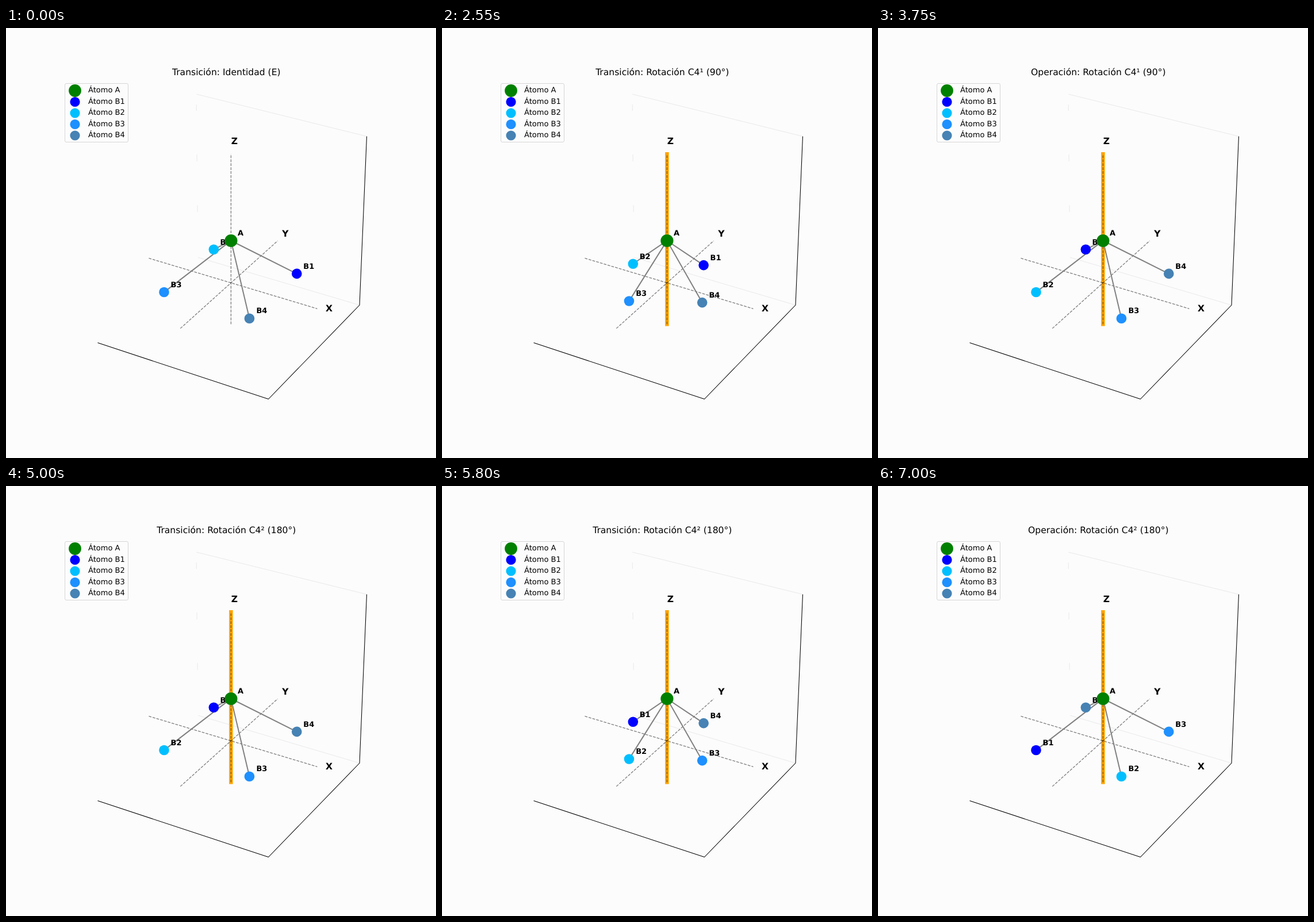
Animation of 748 by 748 pixels, one loop 8000 ms. Source, as an HTML page:

```html
<!DOCTYPE html>
<html lang="es">
<head>
<meta charset="utf-8">
<style>
  html, body { margin: 0; width: 100%; height: 100%; overflow: hidden; background: #fcfcfc; }
  svg { display: block; width: 748px; height: 748px; }
  text { font: 13px "DejaVu Sans", sans-serif; text-rendering: geometricPrecision; }
  #title { font-size: 15.58px; text-anchor: middle; }
  .name { font-weight: bold; }
  .axis-name { font-size: 15.58px; font-weight: bold; text-anchor: middle; }
  .edge { fill: none; stroke: #000; stroke-width: 1.04; stroke-linejoin: round; }
  .pane { fill: none; stroke: #e9e9e9; stroke-width: 1; }
  .axis { stroke: #000; stroke-opacity: .5; stroke-width: 1.3; stroke-dasharray: 4.8 2.08; }
  .bond { stroke: #808080; stroke-width: 2; stroke-linecap: square; }
  #bar { stroke: #ffa500; stroke-width: 6.5; stroke-linecap: square; }
</style>
</head>
<body>
<svg id="stage" viewBox="0 0 748 748">
  <path class="pane" d="M331 115L627.5 188.5M334 399L615 482M331.2 133L331.4 144M332 220L332.2 232M333 308L333.2 320"/>
  <path class="edge" d="M159.5 547.5L456.5 645.5L615 482L627.5 188.5"/>
  <g id="lines"></g>
  <g id="labels">
    <text class="axis-name" x="562" y="493.3">X</text>
    <text class="axis-name" x="486" y="363">Y</text>
    <text class="axis-name" x="397.4" y="202.3">Z</text>
  </g>
  <g id="atoms"></g>
  <text id="title" x="383.3" y="82.3"></text>
  <g id="legend">
    <rect x="102.5" y="96.5" width="110" height="102" rx="2.6" fill="#fcfcfc" stroke="#d6d6d6"/>
  </g>
</svg>
<script>
const LOOP = 8000, STEP = 50, MOVE = 2000;
const COLORS = { A: '#008000', B1: '#0000ff', B2: '#00bfff', B3: '#1e90ff', B4: '#4682b4' };
const CORNERS = [[.5, .5], [-.5, .5], [-.5, -.5], [.5, -.5]];
const SCENES = [
  [0, 'Transición: Identidad (E)'],
  [500, 'Operación: Identidad (E)'],
  [1750, 'Transición: Rotación C4¹ (90°)'],
  [3750, 'Operación: Rotación C4¹ (90°)'],
  [5000, 'Transición: Rotación C4² (180°)'],
  [7000, 'Operación: Rotación C4² (180°)']
];
const $ = id => document.getElementById(id);

function add(parent, tag, attrs, text = '') {
  const el = document.createElementNS('http://www.w3.org/2000/svg', tag);
  set(el, attrs);
  el.textContent = text;
  return $(parent).appendChild(el);
}

function set(el, attrs) {
  for (const key in attrs) el.setAttribute(key, attrs[key]);
}

// Perspective view of the 3D scene
function project(x, y, z) {
  const w = 1 - .0239 * x + .0414 * y - .018 * z;
  return [
    391.4 + (146.4 * x + 84.4 * y) / w,
    443.3 + (43.9 * x - 76 * y - 145.3 * z) / w
  ];
}

function segment(from, to) {
  const [x1, y1] = project(...from), [x2, y2] = project(...to);
  return { x1, y1, x2, y2 };
}

const Z_ENDS = [[0, 0, -.5], [0, 0, 1.5]];
const APEX = [0, 0, .5];
const bar = add('lines', 'line', { id: 'bar', ...segment(...Z_ENDS) });
for (const ends of [[[-1, 0, 0], [1, 0, 0]], [[0, -1, 0], [0, 1, 0]], Z_ENDS])
  add('lines', 'line', { class: 'axis', ...segment(...ends) });

const atoms = Object.entries(COLORS).map(([name, fill], i) => {
  const r = i ? 8.8 : 11.1;
  add('legend', 'circle', { cx: 120, cy: 109 + 19.5 * i, r: r - .2, fill });
  add('legend', 'text', { x: 143, y: 112.2 + 19.5 * i }, 'Átomo ' + name);
  return {
    bond: i ? add('lines', 'line', { class: 'bond' }) : null,
    label: add('labels', 'text', { class: 'name' }, name),
    dot: add('atoms', 'circle', { r, fill })
  };
});

function place(atom, pos) {
  const [cx, cy] = project(...pos);
  const [x, y] = project(...pos.map(v => v + .05));
  set(atom.dot, { cx, cy });
  set(atom.label, { x, y });
  if (atom.bond) set(atom.bond, segment(APEX, pos));
}

function eased(t, start) {
  const p = Math.min(1, Math.max(0, (t - start) / MOVE));
  return (1 - Math.cos(Math.PI * p)) / 2;
}

// Each atom slides straight from one corner of the square to the next
function corner(turns) {
  const i = Math.floor(turns), f = turns - i;
  const a = CORNERS[i % 4], b = CORNERS[(i + 1) % 4];
  return [a[0] + (b[0] - a[0]) * f, a[1] + (b[1] - a[1]) * f, 0];
}

function draw(now) {
  const t = Math.floor(now % LOOP / STEP) * STEP;
  const turns = eased(t, 1750) + eased(t, 5000);
  atoms.forEach((atom, i) => place(atom, i ? corner(i - 1 + turns) : APEX));
  bar.style.visibility = t < 1750 ? 'hidden' : 'visible';
  $('title').textContent = SCENES.filter(([start]) => start <= t).pop()[1];
}

const begin = performance.now();
function tick() {
  draw(performance.now() - begin);
  requestAnimationFrame(tick);
}
tick();
</script>
</body>
</html>
```
